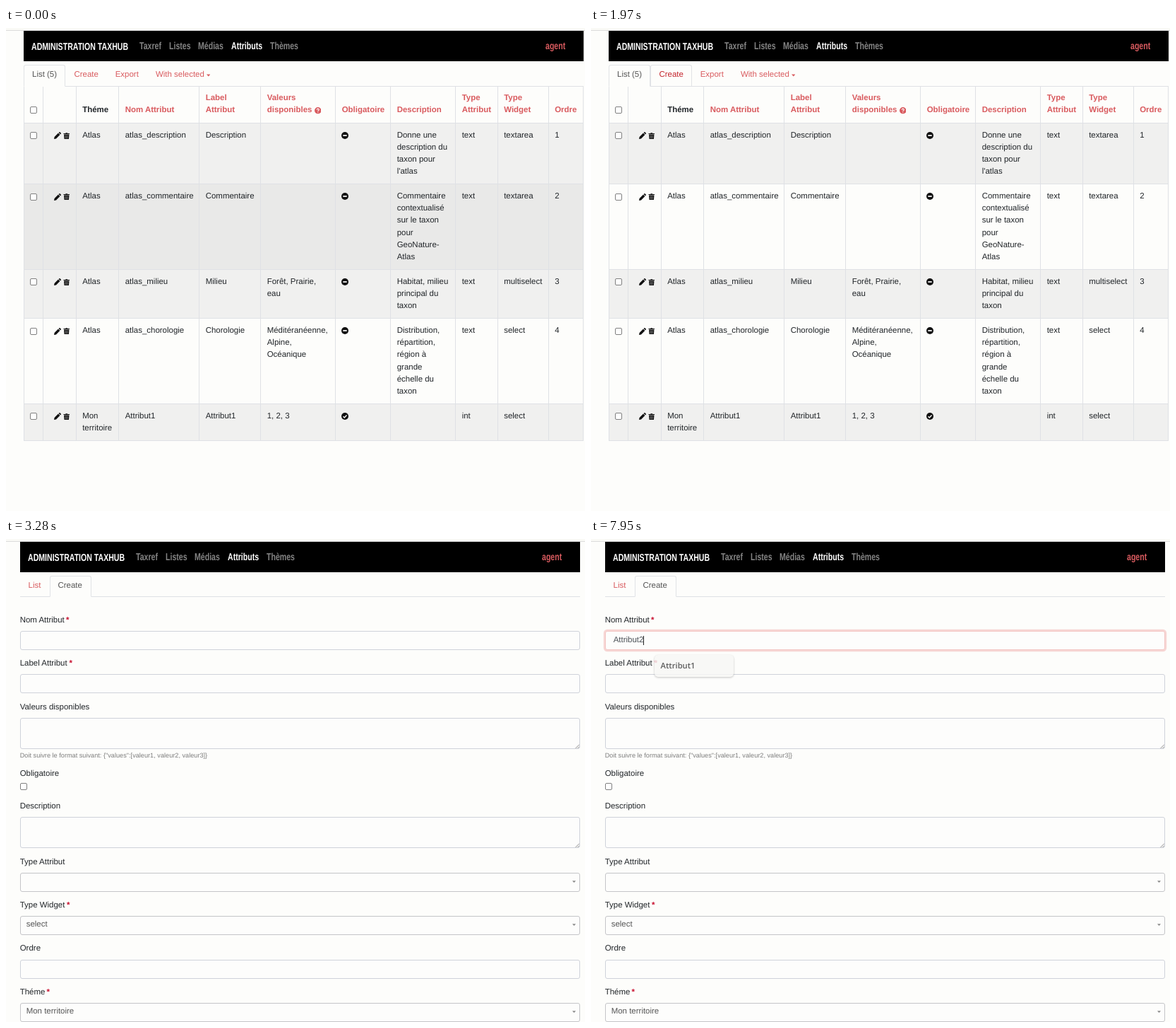
Animation of 820 by 683 pixels, one loop 7.99 s. Source, as an HTML page:

```html
<!DOCTYPE html>
<html lang="fr">
<head>
<meta charset="utf-8">
<title>Attributs</title>
<style>
  html, body { margin: 0; width: 100%; height: 100%; overflow: hidden; }
  body {
    background: #fdfdfb; color: #212529;
    font: 11.47px/17.2px "Liberation Sans", Arial, sans-serif;
    text-rendering: geometricPrecision;
  }
  #stage { position: relative; width: 820px; height: 683px; overflow: hidden; }
  #stage div, #stage span, #stage svg { position: absolute; box-sizing: border-box; }
  span { white-space: pre; }
  .page { left: 0; top: 0; width: 820px; height: 683px; background: #fdfdfb; }
  .edge { left: 0; top: 0; width: 820px; height: 4px; background: #fafaf6; border-bottom: 1px solid #dcdcdc; }
  .bar { background: #000; }
  /* condensed face for the navigation bar */
  .nav { font-size: 14.3px; font-weight: 700; color: #848484; transform: scaleX(.74); transform-origin: 0 0; }
  .white { color: #fff; }
  .red { color: #d95b5f; }
  .hot { color: #c4242c; }
  .tabText { color: #555; }
  .bold { font-weight: 700; }
  .small { font-size: 9.18px; color: #7d7d7d; }
  .star { color: #c8102e; font-weight: 700; }
  .line { background: #dfe1e5; }
  .stripe { background: #f0f0ef; }
  .hover { background: #e9e9e8; }
  .tab { border: 1px solid #e1e3e6; border-bottom-color: #fdfdfb; border-radius: 3px 3px 0 0; background: #fdfdfb; }
  .check { width: 10px; height: 10px; border: 1px solid #808080; border-radius: 2px; background: #fff; }
  .field { border: 1px solid #cfd2da; border-radius: 3px; background: #fdfdfc; }
  .select { border-color: #c4c5c8; }
  .focus { border-color: #f3c6c4; box-shadow: 0 0 0 2.2px #f7d6d4; }
  .typed { color: #4c5157; height: 13px; line-height: 13px; border-right: 1px solid #222; }
  .popup { background: #f7f7f5; border-radius: 5px; box-shadow: 0 1px 3px rgba(0, 0, 0, .28); }
  .popup span { font: 600 11.2px/17px "Open Sans", "Noto Sans", sans-serif; color: #3c3c3c; }
</style>
</head>
<body>
<svg width="0" height="0" style="position:absolute">
  <symbol id="pencil" viewBox="0 0 10 10">
    <path d="M0 10 .6 7 6 1.6 8.4 4 3 9.4zM6.6 1 7.4.2Q8 -.2 8.6.3L9.7 1.4Q10.2 2 9.8 2.6L9 3.4z"/>
  </symbol>
  <symbol id="trash" viewBox="0 0 10 10">
    <path d="M.5 1H3.3L3.8.2H6.2L6.7 1H9.5V2.1H.5zM1.1 2.7H8.9L8.4 9.2Q8.3 10 7.5 10H2.5Q1.7 10 1.6 9.2z"/>
    <path d="M3.4 4V8.7M5 4V8.7M6.6 4V8.7" stroke="#aaa" stroke-width=".6"/>
  </symbol>
  <symbol id="minus" viewBox="0 0 10 10">
    <circle cx="5" cy="5" r="5"/><path d="M2.3 5H7.7" stroke="#fff" stroke-width="1.7"/>
  </symbol>
  <symbol id="tick" viewBox="0 0 10 10">
    <circle cx="5" cy="5" r="5"/><path d="M2.5 5.2 4.3 6.9 7.5 3.5" fill="none" stroke="#fff" stroke-width="1.4"/>
  </symbol>
  <symbol id="help" viewBox="0 0 10 10">
    <circle cx="5" cy="5" r="5"/>
    <path d="M3.4 3.8Q3.6 2.3 5 2.3T6.6 3.7Q6.6 4.4 5.6 4.9 5 5.2 5 6M5 7V8.1" fill="none" stroke="#fff" stroke-width="1.2"/>
  </symbol>
  <symbol id="down" viewBox="0 0 10 10"><path d="M0 2.5H10L5 8z"/></symbol>
  <symbol id="grip" viewBox="0 0 10 10"><path d="M1 10 10 1M6 10 10 6" stroke="#777" stroke-width="1.4"/></symbol>
</svg>
<div id="stage"></div>
<script>
const LOOP = 7990, LINE = 17.2;
const stage = document.getElementById('stage');

function add(parent, tag, cls, x, y, w, h) {
  const el = document.createElement(tag);
  el.className = cls;
  el.style.left = x + 'px';
  el.style.top = y + 'px';
  if (w) el.style.width = w + 'px';
  if (h) el.style.height = h + 'px';
  parent.append(el);
  return el;
}
const box = (parent, cls, x, y, w, h) => add(parent, 'div', cls, x, y, w, h);

// y is the middle of the first line
function text(parent, str, x, y, cls = '') {
  const el = add(parent, 'span', cls, x, y - LINE / 2);
  el.textContent = str;
  return el;
}

function icon(parent, id, cx, cy, size = 10, color = '#111') {
  const half = size / 2;
  parent.insertAdjacentHTML('beforeend',
    `<svg width="${size}" height="${size}" style="left:${cx - half}px;top:${cy - half}px;fill:${color}"><use href="#${id}"/></svg>`);
}

function loop(el, frames) {
  el.animate(frames.map(([ms, opacity, easing = 'step-end']) => ({ offset: ms / LOOP, opacity, easing })),
    { duration: LOOP, iterations: Infinity });
}
function show(el, from, to = LOOP) {
  const frames = [[from, 1], [to, 0]];
  if (from > 0) frames.unshift([0, 0]);
  if (to < LOOP) frames.push([LOOP, 0]);
  loop(el, frames);
}

function header(page, x) {
  box(page, 'edge', 0, 0);
  box(page, 'bar', x, 4, 793, 43);
  text(page, 'ADMINISTRATION TAXHUB', x + 11, 27.5, 'nav white');
  [['Taxref', 163.5], ['Listes', 205.5], ['Médias', 247], ['Attributs', 294], ['Thèmes', 348.5]]
    .forEach(([s, dx]) => text(page, s, x + dx, 26.5, s === 'Attributs' ? 'nav white' : 'nav'));
  text(page, 'agent', x + 739, 26.5, 'nav red');
}

function buildList() {
  const page = box(stage, 'page', 0, 0);
  const cols = [25, 52, 99, 159.5, 273.5, 360.5, 466.5, 544.5, 636.5, 696, 768, 817.5];
  header(page, 25);

  box(page, 'line', 84, 82, 734, 1);
  box(page, 'tab', 25, 52, 59, 31);
  text(page, 'List (5)', 37, 67, 'tabText');
  text(page, 'Create', 96.5, 67, 'red');
  text(page, 'Export', 154.7, 67, 'red');
  text(page, 'With selected', 212, 67, 'red');
  icon(page, 'down', 286.3, 67, 5.5, '#d95b5f');

  const hot = box(page, '', 0, 0, 820, 100);
  box(hot, 'tab', 84, 52, 59, 31);
  box(hot, 'line', 84, 82, 59, 1);
  text(hot, 'Create', 96.5, 67, 'hot');
  show(hot, 1660);

  const heads = ['Théme', 'Nom Attribut', 'Label\nAttribut', 'Valeurs\ndisponibles',
    'Obligatoire', 'Description', 'Type\nAttribut', 'Type\nWidget', 'Ordre'];
  heads.forEach((s, i) =>
    text(page, s, cols[i + 2] + 9.2, s.includes('\n') ? 99.5 : 116.7, i ? 'bold red' : 'bold'));
  icon(page, 'help', 441.3, 117, 9.5, '#d95b5f');
  box(page, 'check', 34, 111);

  const rows = [
    [4, 'Atlas', 'atlas_description', 'Description', '', 'minus', "Donne une\ndescription du\ntaxon pour\nl'atlas", 'text', 'textarea', '1'],
    [6, 'Atlas', 'atlas_commentaire', 'Commentaire', '', 'minus', 'Commentaire\ncontextualisé\nsur le taxon\npour\nGeoNature-\nAtlas', 'text', 'textarea', '2'],
    [3, 'Atlas', 'atlas_milieu', 'Milieu', 'Forêt, Prairie,\neau', 'minus', 'Habitat, milieu\nprincipal du\ntaxon', 'text', 'multiselect', '3'],
    [6, 'Atlas', 'atlas_chorologie', 'Chorologie', 'Méditéranéenne,\nAlpine,\nOcéanique', 'minus', 'Distribution,\nrépartition,\nrégion à\ngrande\néchelle du\ntaxon', 'text', 'select', '4'],
    [2, 'Mon\nterritoire', 'Attribut1', 'Attribut1', '1, 2, 3', 'tick', '', 'int', 'select', '']
  ];
  const hovers = [[90, 370], [0, 90]];
  let y = 134.7;
  rows.forEach(([lines, ...cells], r) => {
    const h = (lines + 1) * LINE + .35, mid = y + 17.6;
    if (r % 2 === 0) box(page, 'stripe', 25, y, 793, h);
    if (hovers[r]) show(box(page, 'hover', 25, y, 793, h), ...hovers[r]);
    box(page, 'line', 25, Math.round(y) - 1, 793, 1);
    box(page, 'check', 34, Math.round(mid) - 5);
    icon(page, 'pencil', 73, mid);
    icon(page, 'trash', 86, mid, 9.5);
    cells.forEach((s, i) => {
      if (i === 4) icon(page, s, 480.3, mid - .2, 10);
      else text(page, s, cols[i + 2] + 9.2, mid);
    });
    y += h;
  });
  box(page, 'line', 25, Math.round(y) - 1, 793, 1);
  cols.forEach(x => box(page, 'line', Math.floor(x), 83, 1, y - 83));
}

function buildForm() {
  const page = box(stage, 'page', 0, 0);
  show(page, 2390);
  header(page, 20);

  box(page, 'line', 20, 81, 793, 1);
  box(page, 'tab', 61.5, 52, 59, 30);
  text(page, 'List', 31.5, 67, 'red');
  text(page, 'Create', 73.5, 67, 'tabText');

  // label, middle of label, box height, star position, select value
  const fields = [
    ['Nom Attribut', 115.3, 27, 85],
    ['Label Attribut', 176.7, 27, 89.5],
    ['Valeurs disponibles', 238.2, 44],
    ['Description', 378.7, 44],
    ['Type Attribut', 457.2, 27, 0, ''],
    ['Type Widget', 518.6, 27, 86, 'select'],
    ['Ordre', 580, 27],
    ['Théme', 641.4, 27, 57.5, 'Mon territoire']
  ];
  fields.forEach(([label, y, h, star, value]) => {
    const top = Math.round(y + 14.7), isSelect = value !== undefined;
    text(page, label, 19.7, y);
    if (star) text(page, '*', star, y, 'star');
    box(page, isSelect ? 'field select' : 'field', 20, top, 793, h);
    if (isSelect) {
      text(page, value, 28.7, y + 27.2, 'tabText');
      icon(page, 'down', 804.8, y + 27.2, 5, '#888');
    }
    if (h === 44) icon(page, 'grip', 808.5, top + 40, 6);
  });
  text(page, 'Doit suivre le format suivant: {"values":[valeur1, valeur2, valeur3]}', 19.7, 306.7, 'small');
  text(page, 'Obligatoire', 19.7, 333);
  box(page, 'check', 20, 345);

  const focus = box(page, 'field focus', 20, 130, 793, 27);
  loop(focus, [[0, 0], [3280, 0, 'ease-in-out'], [3430, 1], [LOOP, 1]]);
  buildTyping(page);
  buildPopups(page);
}

function buildTyping(page) {
  const states = [
    ['', 3330, 3910], ['', 4550, 5120], ['', 5710, 6320],
    ['A', 6320, 6620], ['At', 6620, 6650], ['Att', 6650, 6710], ['Attr', 6710, 6760],
    ['Attri', 6760, 6950], ['Attrib', 6950, 7150], ['Attribu', 7150, 7380],
    ['Attribut', 7380, 7920], ['Attribut2', 7920, LOOP]
  ];
  for (const [s, from, to] of states) {
    const el = add(page, 'span', 'typed', 31.7, 137);
    el.textContent = s;
    show(el, from, to);
  }
}

function buildPopups(page) {
  const popup = (items, w, h) => {
    const el = box(page, 'popup', 90, 164, w, h);
    items.forEach((s, i) => text(el, s, 8.5, 15.6 + i * 25.6));
    return el;
  };
  show(popup(['Attribut1', 'sdfsdf', 'sfgsdfgsdrfhgqer'], 128, 83), 3480, 6410);
  loop(popup(['Attribut1'], 112, 31), [[0, 0], [6410, 1], [7950, .82], [LOOP, .82]]);
}

buildList();
buildForm();
</script>
</body>
</html>
```
